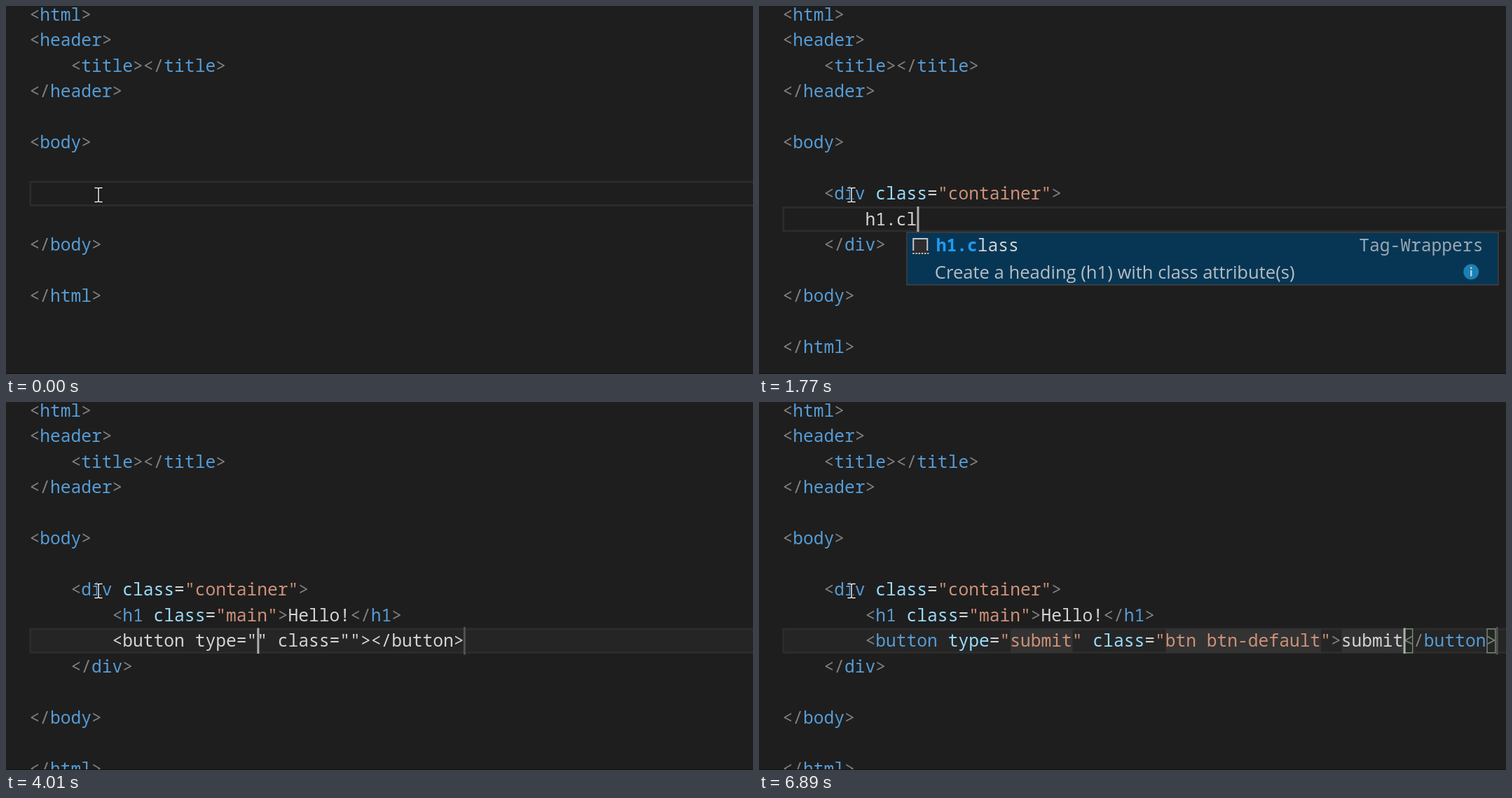
Animation, 1066 px wide and 525 px high, one loop 6970 ms. Source, as an HTML page:

```html
<!DOCTYPE html>
<html lang="en">
<head>
<meta charset="utf-8">
<title>Code editor</title>
<style>
html, body { margin: 0; width: 100%; height: 100%; overflow: hidden; background: #1e1e1e; }
svg { display: block; width: 100%; height: 100%; }
text { white-space: pre; font: 24.617px "Noto Sans Mono", monospace; fill: #d4d4d4; }
.note { font: 25.6px "Open Sans", sans-serif; opacity: .86; }
.abc { font: 11.5px "Open Sans", sans-serif; }
.dim { opacity: .72; }
.hit { fill: #1f9cf0; font-weight: 700; }
</style>
</head>
<body>
<svg id="stage" viewBox="0 0 1066 525"></svg>
<script>
const LOOP = 6970, W = 14.77, H = 36.5;
const colX = c => 34 + c * W;
const rowY = r => 36.5 * r - 6;

const TAB = '    ', TAB2 = TAB + TAB;
const HEAD = ['<html>', '<header>', TAB + '<title></title>', '</header>', '', '<body>', ''];
const FOOT = ['', '</body>', '', '</html>'];
const OPEN = TAB + '<div class="container">', CLOSE = TAB + '</div>';
const HELLO = TAB2 + '<h1 class="main">Hello!</h1>';

// --- editor states ---
const state = (body, row, col, more) => ({ lines: [...HEAD, ...body, ...FOOT], row, col, ...more });
const list = (col, hit, ...items) => ({ col, hit, items });

const typeDiv = (s, pop) => state([TAB + s], 7, 4 + s.length, { pop });

const divClass = s => state([`${TAB}<div class="${s}">`, '', CLOSE], 7, 16 + s.length,
  { block: [7, 3], marks: [[16, s.length]], end: [8, 8] });

const typeH1 = (s, pop) => state([OPEN, TAB2 + s, CLOSE], 8, 8 + s.length, { pop });

const h1Class = s => {
  const line = `${TAB2}<h1 class="${s}"></h1>`;
  return state([OPEN, line, CLOSE], 8, 19 + s.length,
    { block: [8, 1], marks: [[19, s.length]], end: [8, line.length] });
};

const h1Text = (s, pop) => {
  const line = `${TAB2}<h1 class="main">${s}</h1>`, col = 25 + s.length;
  return state([OPEN, line, CLOSE], 8, col, {
    block: [8, 1], end: [8, line.length], pair: [col, line.length - 1], pop,
    marks: [[19, 4], [25, s.length]]
  });
};

const typeBtn = (s, pop) => state([OPEN, HELLO, TAB2 + s, CLOSE], 9, 8 + s.length, { pop });

// stop: 0 = type value, 1 = class value, 2 = content
const button = (type, cls, txt, stop, more) => {
  const a = `${TAB2}<button type="`, b = `${a}${type}" class="`, c = `${b}${cls}">`;
  const line = `${c}${txt}</button>`;
  const col = [a + type, b + cls, c + txt][stop].length;
  return state([OPEN, HELLO, line, CLOSE], 9, col, {
    block: [9, 1], end: [9, line.length],
    marks: [[a.length, type.length], [b.length, cls.length], [c.length, txt.length]],
    pair: stop === 2 ? [col, line.length - 1] : null, ...more
  });
};
const btnType = s => button(s, '', '', 0);
const btnClass = s => button('submit', s, '', 1);
const btnText = (s, pop) => button('submit', 'btn btn-default', s, 2, { pop });

// --- timeline ---
const steps = [[0, state([''], 7, null)]];
const run = (from, to, states) => states.forEach((s, i) => {
  const t = from + (to - from) * i / (states.length - 1);
  steps.push([Math.floor(t / 10) * 10, s]);
});

const headings = ['h1.class', 'h2.class', 'h3.class', 'h4.class', 'h5.class'];
const sTags = ['section.class', 'select.class', 'small.class', 'span.class', 'strong.class'];
const bTags = ['blockquote.class', 'body', 'body.class', 'button.class'];
const he = h1Text('He', list(27, 2, 'header', 'header.class'));
const submit = n => list(55, n, 'submit');

run(80, 690, [
  typeDiv('d'), typeDiv('di', list(5, 2, 'div.class')), typeDiv('div', list(5, 3, 'div.class')),
  typeDiv('div.'), typeDiv('div.c'), typeDiv('div.cl'),
  typeDiv('div.cl', list(10, 6, 'div.class')), divClass(''), divClass('c')
]);
run(780, 1450, [
  ...[2, 3, 4, 5, 6, 7, 8, 9].map(n => divClass('container'.slice(0, n))),
  typeH1(''), typeH1('h', list(9, 1, ...headings))
]);
run(1530, 2190, [
  typeH1('h1', list(9, 2, 'h1.class')), typeH1('h1.'), typeH1('h1.c'),
  typeH1('h1.cl', list(12, 4, 'h1.class')),
  h1Class(''), h1Class('m'), h1Class('mai'), h1Class('main'), h1Text('')
]);
run(2260, 2910, [
  h1Text('H'), h1Text('H', list(26, 1, ...headings)), he, he,
  h1Text('Hel'), h1Text('Hell'), h1Text('Hello'), h1Text('Hello!'),
  state([OPEN, HELLO, CLOSE], 8, HELLO.length)
]);
run(2990, 3640, [
  typeBtn(''), typeBtn('b'), typeBtn('b', list(9, 1, ...bTags)),
  ...[2, 3, 4, 5, 6].map(n => typeBtn('button'.slice(0, n), list(9, n, 'button.class'))),
  typeBtn('button.')
]);
run(3710, 4400, [
  typeBtn('button.c'), typeBtn('button.cl', list(16, 8, 'button.class')),
  typeBtn('button.cl', list(16, 9, 'button.class')),
  button('', '', '', 0, { raw: true }), button('', '', '', 0, { raw: true }),
  btnType(''), btnType('s'), btnType('su'), btnType('sub'), btnType('subm')
]);
run(4490, 4570, [btnType('submi'), btnType('submit')]);
run(4730, 4870, [btnClass(''), btnClass(''), btnClass('b')]);
run(5010, 5460, ['bt', 'btn', 'btn', 'btn ', 'btn b', 'btn bt', 'btn btn'].map(btnClass));
run(5630, 6250, [
  ...[8, 9, 10, 11, 12, 13, 14, 15].map(n => btnClass('btn btn-default'.slice(0, n))),
  btnText('')
]);
run(6350, 6890, [
  btnText('s'), btnText('s', list(55, 1, ...sTags)),
  ...[2, 3, 4, 5].map(n => btnText('submit'.slice(0, n), submit(n))),
  btnText('submit'), btnText('submit')
]);

// --- drawing ---
const esc = s => s.replace(/&/g, '&amp;').replace(/</g, '&lt;');
const rect = (x, y, w, h, fill, more = '') =>
  `<rect x="${x}" y="${y}" width="${w}" height="${h}" fill="${fill}" ${more}/>`;
const text = (x, y, inner, cls = '') => `<text x="${x}" y="${y}" class="${cls}">${inner}</text>`;
const span = (s, fill) => `<tspan fill="${fill}">${esc(s)}</tspan>`;

function paint(line) {
  let inTag = false, named = false;
  return line.replace(/<\/?|>|"[^"]*"|[\w-]+|[^]/g, s => {
    if (s[0] === '<') { inTag = true; named = false; return span(s, '#808080'); }
    if (s === '>') { inTag = false; return span(s, '#808080'); }
    if (s[0] === '"') return span(s, '#ce9178');
    if (inTag && /\w/.test(s)) {
      const fill = named ? '#9cdcfe' : '#569cd6';
      named = true;
      return span(s, fill);
    }
    return s;
  });
}

function icon(x, y, word) {
  const line = 'stroke="#c5c5c5" stroke-width="2"';
  if (word) return rect(x, y + 1, 23, 20, '#2d2d30', line) + text(x + 1.8, y + 15, 'abc', 'abc');
  return rect(x, y, 22, 23, '#2d2d30') +
    `<path d="M${x + 1} ${y + 18}V${y + 1}h20v17" fill="none" ${line}/>` +
    `<path d="M${x} ${y + 22}h23" ${line} stroke-dasharray="2.4 1.8"/>`;
}

function popup({ col, hit, items }, row) {
  const x = colX(col), y = rowY(row + 1), step = 36.8;
  const rich = items[0].includes('.');
  const rows = items.length + (rich ? 1 : 0);
  let out = rect(x - .3, y + .5, 844, rows * step + 1.2, '#2d2d30', 'stroke="#454545" stroke-width="1.4"');
  out += rect(x + .5, y + 1.3, 842.4, step * (rich ? 2 : 1) - .4, '#073655');
  items.forEach((s, i) => {
    const top = y + step * (i + (rich && i ? 1 : 0));
    out += icon(x + 8, top + 8.5, !s.includes('.'));
    out += text(x + 41.4, top + 27.5, `<tspan class="hit">${s.slice(0, hit)}</tspan>${s.slice(hit)}`);
  });
  if (rich) {
    const tag = items[0].split('.')[0];
    const what = tag === 'h1' ? 'heading (h1)' : tag;
    out += text(x + 645, y + 27.5, 'Tag-Wrappers', 'dim');
    out += text(x + 39.6, y + 66.5, `Create a ${what} with class attribute(s)`, 'note');
    out += `<circle cx="${x + 805}" cy="${y + 56.7}" r="11" fill="#1b80b2"/>`;
    out += rect(x + 803.8, y + 54.5, 2.4, 8.5, '#b5d3e4') + rect(x + 803.8, y + 50, 2.4, 2.6, '#b5d3e4');
  }
  return out;
}

const beam = 'M127 259.5h3.6q1.4 0 1.4 1.4q0-1.4 1.4-1.4h3.6M132 260v18.5' +
  'M127 279.5h3.6q1.4 0 1.4-1.4q0 1.4 1.4 1.4h3.6';
const pointer = `<g fill="none" stroke-linecap="square"><path d="${beam}" stroke="#111" stroke-width="3.6"/>` +
  `<path d="${beam}" stroke="#f0f0f0" stroke-width="1.5"/></g>`;

function draw(s) {
  const y = rowY(s.row);
  let out = rect(0, 0, 1066, 525, '#1e1e1e');
  if (s.block) out += rect(33, rowY(s.block[0]), 1040, H * s.block[1], '#252525');
  out += rect(34.8, y + 1.4, 1050, 33.5, 'none', 'stroke="#2c2c2c" stroke-width="2.7"');
  for (const [c, n] of s.marks || []) out += rect(colX(c), y + 1, n * W, H - 2, '#333');
  for (const c of s.pair || [])
    out += rect(colX(c) + .7, y + 1.2, W - 3, H - 2.4, '#1f2a1f', 'stroke="#888" stroke-width="1.4"');
  s.lines.forEach((line, r) => {
    if (line) out += text(33.4, 20.5 + H * r, s.raw && r === s.row ? esc(line) : paint(line));
  });
  if (s.end) out += rect(colX(s.end[1]) - 1.5, rowY(s.end[0]) - 1.5, 3, H + 3, '#525252');
  if (s.col !== null) out += rect(colX(s.col) - .6, y, 3, H, '#aeafad');
  if (s.pop) out += popup(s.pop, s.row);
  return out + pointer + rect(0, 524, 1066, 1, '#141414');
}

const stage = document.getElementById('stage');
let shown = null;

function tick() {
  const t = performance.now() % LOOP;
  let now = steps[0];
  for (const s of steps) if (s[0] <= t) now = s;
  if (now !== shown) stage.innerHTML = draw((shown = now)[1]);
  requestAnimationFrame(tick);
}
tick();
</script>
</body>
</html>
```
